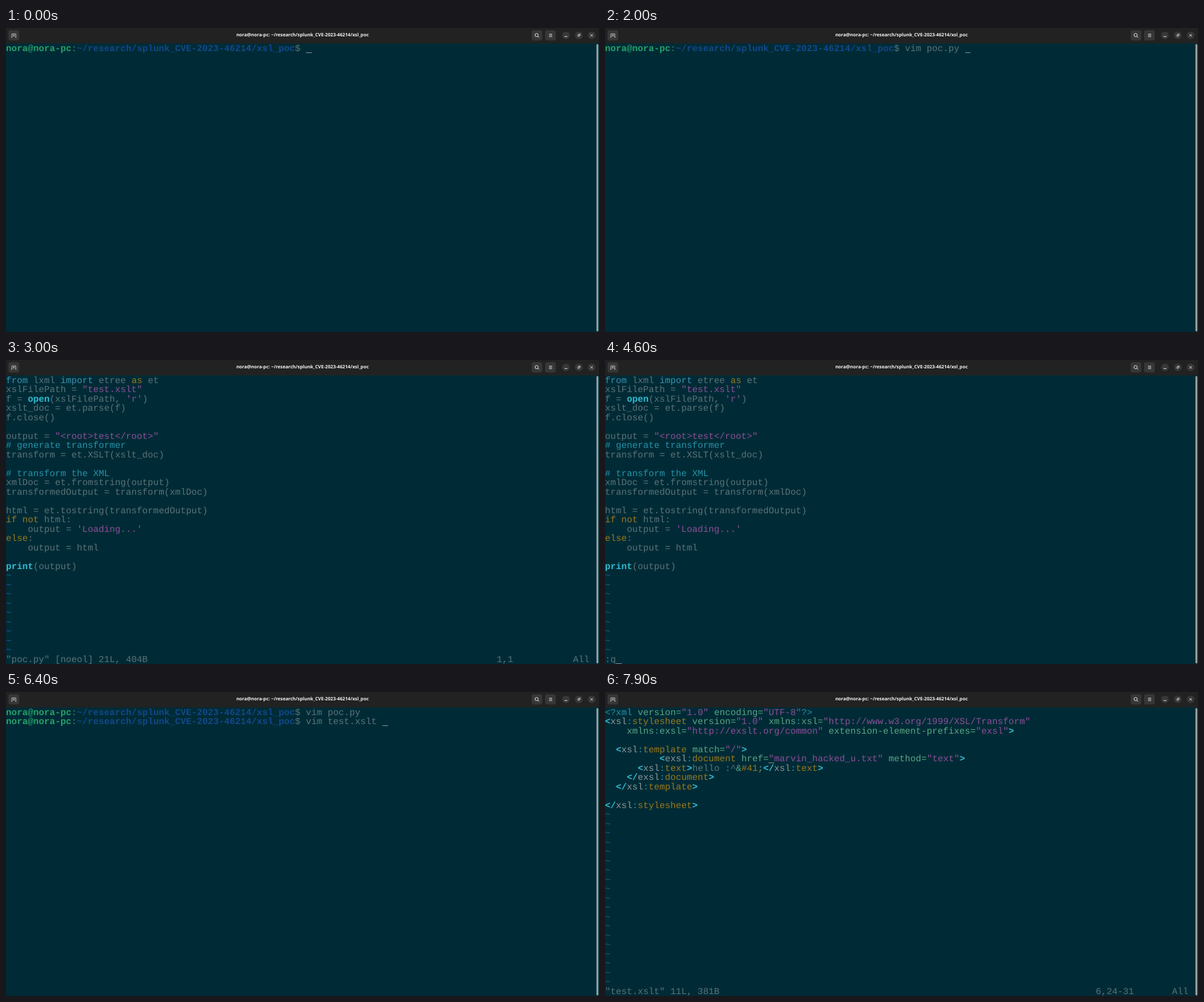
An HTML page that plays this animation: 925x474 px, repeating every 8 s.

```html
<!DOCTYPE html>
<html lang="en">
<head>
<meta charset="utf-8">
<title>Terminal</title>
<style>
  html, body { margin: 0; width: 100%; height: 100%; overflow: hidden; background: #002b36; }
  #bar { position: absolute; left: 0; top: 0; width: 925px; height: 24px; }
  #title {
    position: absolute; left: 0; top: 0; width: 925px; text-align: center;
    font: bold 7.22px/23px "Open Sans", "Noto Sans", sans-serif; color: #f4f4f4;
    text-rendering: geometricPrecision; white-space: pre;
  }
  #screen {
    position: absolute; left: 0; top: 25.6px; margin: 0; color: #5b7379;
    font: 14.18px/14.5px "Liberation Mono", monospace;
    text-rendering: geometricPrecision; font-variant-ligatures: none;
  }
  #cursor { position: absolute; width: 8.5px; height: 1.2px; background: #7d9093; }
  #scroll { position: absolute; left: 920.5px; top: 25px; width: 3.5px; height: 448px; border-radius: 2px; background: #929fa2; }
  .g { color: #26a269; font-weight: bold; }
  .d { color: #12488b; font-weight: bold; }
  .b { color: #31bdd4; font-weight: bold; }
  .c { color: #2593a9; }
  .p { color: #3b91ae; }
  .y { color: #9a7a1d; }
  .m { color: #8b4f9a; }
  .t { color: #59a684; }
  .n { color: #8d9899; }
  .z { color: #1d5c9b; }
</style>
</head>
<body>
<svg id="bar" viewBox="0 0 925 24" fill="none" stroke="#e4e4e4" stroke-width="1">
  <rect width="925" height="24" fill="#222" stroke="none"/>
  <g fill="#373737" stroke="none">
    <rect x="4" y="3.5" width="16.5" height="16" rx="3"/>
    <rect x="820" y="3.5" width="16.5" height="16" rx="3"/>
    <rect x="841" y="3.5" width="16.5" height="16" rx="3"/>
    <circle cx="873.5" cy="11.5" r="6"/>
    <circle cx="893.5" cy="11.5" r="6"/>
    <circle cx="913.5" cy="11.5" r="6"/>
  </g>
  <path d="M9.2 14.5V9.2H15.2V14.5M8.2 14.4H9.7M14.7 14.4H16.2M12.2 10.4V13.4M10.7 11.9H13.7" stroke-width=".8"/>
  <circle cx="827.7" cy="11.1" r="2.5"/>
  <path d="M829.6 13L831.6 15"/>
  <path d="M847 9.5H852M847 11.5H852M847 13.5H852" stroke-width=".8"/>
  <path d="M871.3 13.3H875.7"/>
  <path d="M892 10.7H894.4V13.1H892ZM893 9.5H895.6V12" stroke-width=".7"/>
  <path d="M911.7 9.7L915.3 13.3M915.3 9.7L911.7 13.3"/>
</svg>
<div id="title">nora@nora-pc: ~/research/splunk_CVE-2023-46214/xsl_poc</div>
<pre id="screen"></pre>
<div id="cursor"></div>
<div id="scroll"></div>
<script>
const LOOP = 8000, COL = 8.51, ROW = 14.5, TOP = 24.4, ROWS = 31, BLINK = 600;
const screen = document.getElementById('screen');
const cursor = document.getElementById('cursor');

// {k|text} colours text with class k
const paint = s => s
  .replace(/&/g, '&amp;').replace(/</g, '&lt;').replace(/>/g, '&gt;')
  .replace(/\{(\w)\|([^}]*)\}/g, '<span class="$1">$2</span>');

const prompt = '{g|nora@nora-pc}:{d|~/research/splunk_CVE-2023-46214/xsl_poc}$ ';
const promptLen = 55;

const python = `{p|from} lxml {p|import} etree {y|as} et
xslFilePath = {m|"test.xslt"}
f = {b|open}(xslFilePath, {m|'r'})
xslt_doc = et.parse(f)
f.close()

output = {m|"<root>test</root>"}
{c|# generate transformer}
transform = et.XSLT(xslt_doc)

{c|# transform the XML}
xmlDoc = et.fromstring(output)
transformedOutput = transform(xmlDoc)

html = et.tostring(transformedOutput)
{y|if} {y|not} html:
    output = {m|'Loading...'}
{y|else}:
    output = html

{b|print}(output)`;

const open = (ns, name) => `{b|<}{n|${ns}}{c|:}{y|${name}}`;
const close = (ns, name) => `{b|</}{n|${ns}}{c|:}{y|${name}}{b|>}`;
const attr = (name, value) => ` {t|${name.replace(':', '}{c|:}{t|')}=}{m|"${value}"}`;
const end = '{b|>}';

const xslt = [
  '{c|<?xml}' + attr('version', '1.0') + attr('encoding', 'UTF-8') + '{c|?>}',
  open('xsl', 'stylesheet') + attr('version', '1.0') + attr('xmlns:xsl', 'http://www.w3.org/1999/XSL/Transform'),
  '   ' + attr('xmlns:exsl', 'http://exslt.org/common') + attr('extension-element-prefixes', 'exsl') + end,
  '',
  '  ' + open('xsl', 'template') + attr('match', '/') + end,
  '          ' + open('exsl', 'document') + attr('href', 'marvin_hacked_u.txt') + attr('method', 'text') + end,
  '      ' + open('xsl', 'text') + end + 'hello :^{t|&}{y|#41}{t|;}' + close('xsl', 'text'),
  '    ' + close('exsl', 'document'),
  '  ' + close('xsl', 'template'),
  '',
  close('xsl', 'stylesheet')
].join('\n');

const ruler = (file, pos) => file.padEnd(90) + pos.padEnd(14) + 'All';

function editor(text, status) {
  const lines = text.split('\n');
  while (lines.length < ROWS - 1) lines.push('{z|~}');
  return lines.concat(status).join('\n');
}

const steps = [];
const show = (at, text, col, row) => steps.push({ at, html: paint(text), col, row });

function type(history, keys) {
  const before = history.map(cmd => prompt + cmd + '\n').join('');
  for (const [at, cmd] of keys)
    show(at, before + prompt + cmd, promptLen + cmd.length, history.length);
}

type([], [[0, ''], [800, 'v'], [1000, 'vim'], [1200, 'vim '],
  [1700, 'vim p'], [1800, 'vim po'], [1900, 'vim poc'], [2000, 'vim poc.py ']]);
show(2400, editor(python, ruler('"poc.py" [noeol] 21L, 404B', '1,1')), 0, 0);
show(4200, editor(python, ':'), 1, ROWS - 1);
show(4600, editor(python, ':q'), 2, ROWS - 1);
type(['vim poc.py'], [[4800, ''], [5200, 'v'], [5400, 'vim'], [5600, 'vim '],
  [5900, 'vim t'], [6000, 'vim te'], [6100, 'vim test.xslt ']]);
show(6700, editor(xslt, ruler('"test.xslt" 11L, 381B', '6,24-31')), 30, 5);

let current;
function draw(now) {
  const t = now % LOOP;
  const step = steps.filter(s => s.at <= t).pop();
  if (step !== current) {
    current = step;
    screen.innerHTML = step.html;
    cursor.style.left = step.col * COL + 'px';
    cursor.style.top = TOP + (step.row + 1) * ROW - 1.2 + 'px';
  }
  // the shell cursor stays lit before the first key
  const lit = step.at === 0 || Math.floor((t - step.at) / BLINK) % 2 === 0;
  cursor.style.visibility = lit ? 'visible' : 'hidden';
}

let start;
function tick(now) {
  start ??= now;
  draw(Math.max(0, now - start));
  requestAnimationFrame(tick);
}
draw(0);
requestAnimationFrame(tick);
</script>
</body>
</html>
```
